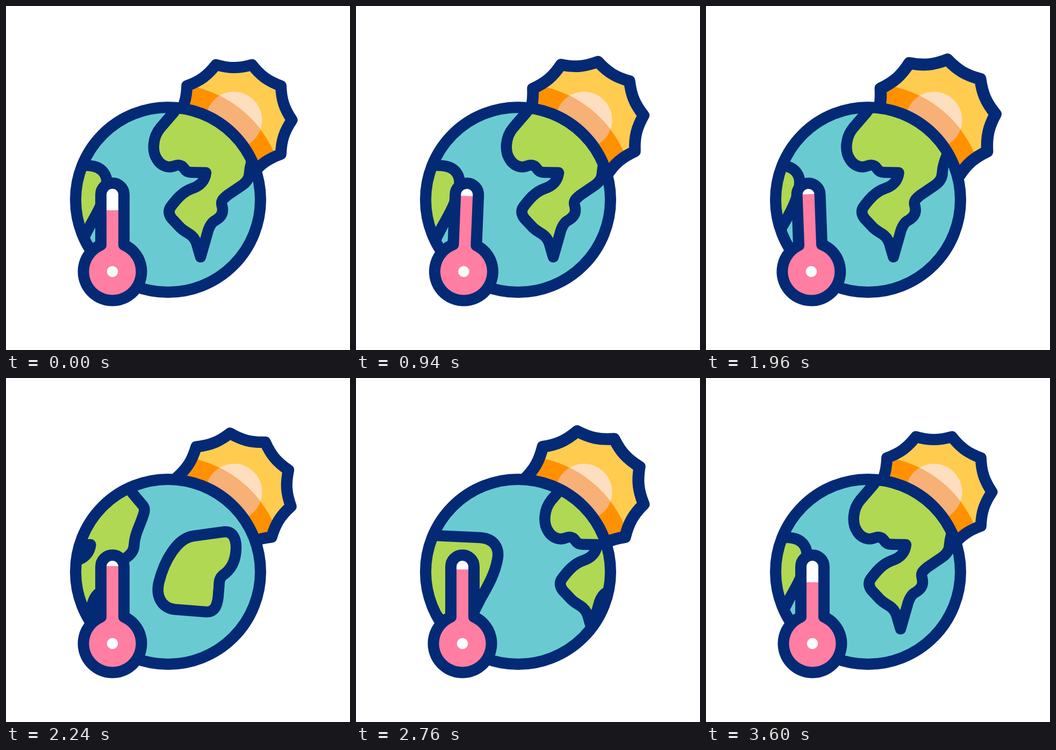
Recreate the animation shown at these times as an HTML page with a canvas. Size 640 by 640 pixels, loop 3.62 s.

```html
<!DOCTYPE html>
<html lang="en">
<head>
<meta charset="utf-8">
<title>Warming globe</title>
<style>
  html, body { margin: 0; width: 100%; height: 100%; overflow: hidden; background: #fff; }
  canvas { display: block; }
</style>
</head>
<body>
<canvas id="stage" width="640" height="640"></canvas>
<script>
const ctx = document.getElementById('stage').getContext('2d');
const LOOP = 3620, END = 3600, TAU = Math.PI * 2;
const NAVY = '#042a75', GREEN = '#b0d852', PINK = '#ff7ea2';
const GLOBE = [301.5, 360.5], SUN = [424, 212], BULB = [198, 494];
const MAP_WIDTH = 710, WINDUP = 20;

const land = [
  // large continent
  'M340 160L312 198L287 227C273 244 271 270 281 285C288 297 301 302 312 298' +
  'C322 294 327 296 332 303C335 308 339 309.5 345 309.5L372 310' +
  'C370 327 360 335 345 340C328 346 316 361 307 373C301 381 303 389 309 396L324 412' +
  'C332 420 338 421 345 427C352 433 355 441 357 450L362 467L374 425' +
  'C377 412 382 402 391 398C401 392 405 384 402 372C399 362 404 359 412 352L440 333' +
  'C451 325 453 317 453 310C454 290 464 275 471 252Q474 243 469 237L448 212L420 165Z',
  // island
  'M563 294L621 286C638 285 645 302 642 325C640 345 631 358 618 367C609 374 612 385 610 398' +
  'C609 420 605 437 585 435L528 430.5C503 427 493 405 499 380C509 340 533 298 563 294Z',
  // tapering continent
  'M30 290L69 293L155 297C181 299 191 317 186.500 338C182 363 170 385 155 411L130 460' +
  'C120 478 100 476 90 462L55 418C30 385 5 370 0 330C-2 300 10 290 30 290Z'
].map(d => new Path2D(d));

const thermometer = new Path2D(
  'M176.5 444.5V351a21.5 21.5 0 0 1 43 0V444.5A54 54 0 1 1 176.5 444.5Z');

const clamp = v => Math.min(1, Math.max(0, v));
const progress = (t, from, to) => clamp((t - from) / (to - from));
const smooth = u => (1 - Math.cos(Math.PI * u)) / 2;

// Bezier easing with flat ends; x1 and x2 set the handle lengths.
function ease(u, x1, x2) {
  let lo = 0, hi = 1;
  for (let i = 0; i < 24; i++) {
    const s = (lo + hi) / 2, r = 1 - s;
    if (3 * x1 * s * r * r + 3 * x2 * s * s * r + s ** 3 < u) lo = s; else hi = s;
  }
  return lo * lo * (3 - 2 * lo);
}

function disc([x, y], r, color) {
  ctx.beginPath();
  ctx.arc(x, y, r, 0, TAU);
  ctx.fillStyle = color;
  ctx.fill();
}

function clipDisc([x, y], r) {
  ctx.beginPath();
  ctx.arc(x, y, r, 0, TAU);
  ctx.clip();
}

function layer(draw) {
  ctx.save();
  draw();
  ctx.restore();
}

function sunPath(angle, scale) {
  const path = new Path2D(), step = TAU / 10;
  const at = (r, i) => {
    const a = angle + i * step;
    return [SUN[0] + r * scale * Math.cos(a), SUN[1] + r * scale * Math.sin(a)];
  };
  path.moveTo(...at(108, 0));
  for (let i = 0; i < 10; i++) {
    path.bezierCurveTo(...at(96, i + 0.36), ...at(96, i + 0.64), ...at(108, i + 1));
  }
  path.closePath();
  return path;
}

function drawSun(t) {
  const scale = 1 + 0.08 * smooth(t / 600);
  const angle = TAU * 0.7 * t / END - 0.03 * Math.sin(TAU * t / 1200);
  const path = sunPath(angle, scale);
  ctx.fillStyle = '#ffcc50';
  ctx.fill(path);
  disc(SUN, 52.5, '#fddebe');
  layer(() => {
    ctx.clip(path);
    clipDisc(GLOBE, 216);
    ctx.fillStyle = '#ff9100';
    ctx.fillRect(0, 0, 640, 640);
    disc(SUN, 52.5, '#f7b075');
  });
  ctx.lineWidth = 21 * scale;
  ctx.stroke(path);
}

function drawGlobe(t) {
  const shift = WINDUP * smooth(progress(t, 600, 1620))
    - (MAP_WIDTH + WINDUP) * ease(progress(t, 1620, END), 0.575, 0.027);
  disc(GLOBE, 172, '#69cbd1');
  ctx.lineWidth = 20.5;
  layer(() => {
    clipDisc(GLOBE, 172);
    ctx.translate(shift, 0);
    for (let copy = 0; copy < 2; copy++) {
      for (const path of land) {
        ctx.fillStyle = GREEN;
        ctx.fill(path);
        ctx.stroke(path);
      }
      ctx.translate(MAP_WIDTH, 0);
    }
  });
  ctx.lineWidth = 21;
  ctx.beginPath();
  ctx.arc(...GLOBE, 172, 0, TAU);
  ctx.stroke();
}

function drawThermometer(t) {
  const tilt = 2.5 * Math.sin(TAU * 3 * progress(t, 200, 2060));
  const level = 380 - 30 * (smooth(progress(t, 0, 1200)) - smooth(progress(t, 2400, END)));
  layer(() => {
    ctx.translate(198, 552);
    ctx.rotate(tilt * Math.PI / 180);
    ctx.translate(-198, -552);
    ctx.fillStyle = PINK;
    ctx.fill(thermometer);
    layer(() => {
      ctx.clip(thermometer);
      ctx.fillStyle = '#fff';
      ctx.fillRect(170, 320, 56, level - 320);
    });
    ctx.lineWidth = 21;
    ctx.stroke(thermometer);
    disc(BULB, 10.3, '#fff');
  });
}

function frame(now) {
  const t = Math.min(now % LOOP, END);
  ctx.fillStyle = '#fff';
  ctx.fillRect(0, 0, 640, 640);
  ctx.strokeStyle = NAVY;
  ctx.lineJoin = 'round';
  drawSun(t);
  drawGlobe(t);
  drawThermometer(t);
  requestAnimationFrame(frame);
}
requestAnimationFrame(frame);
</script>
</body>
</html>
```
